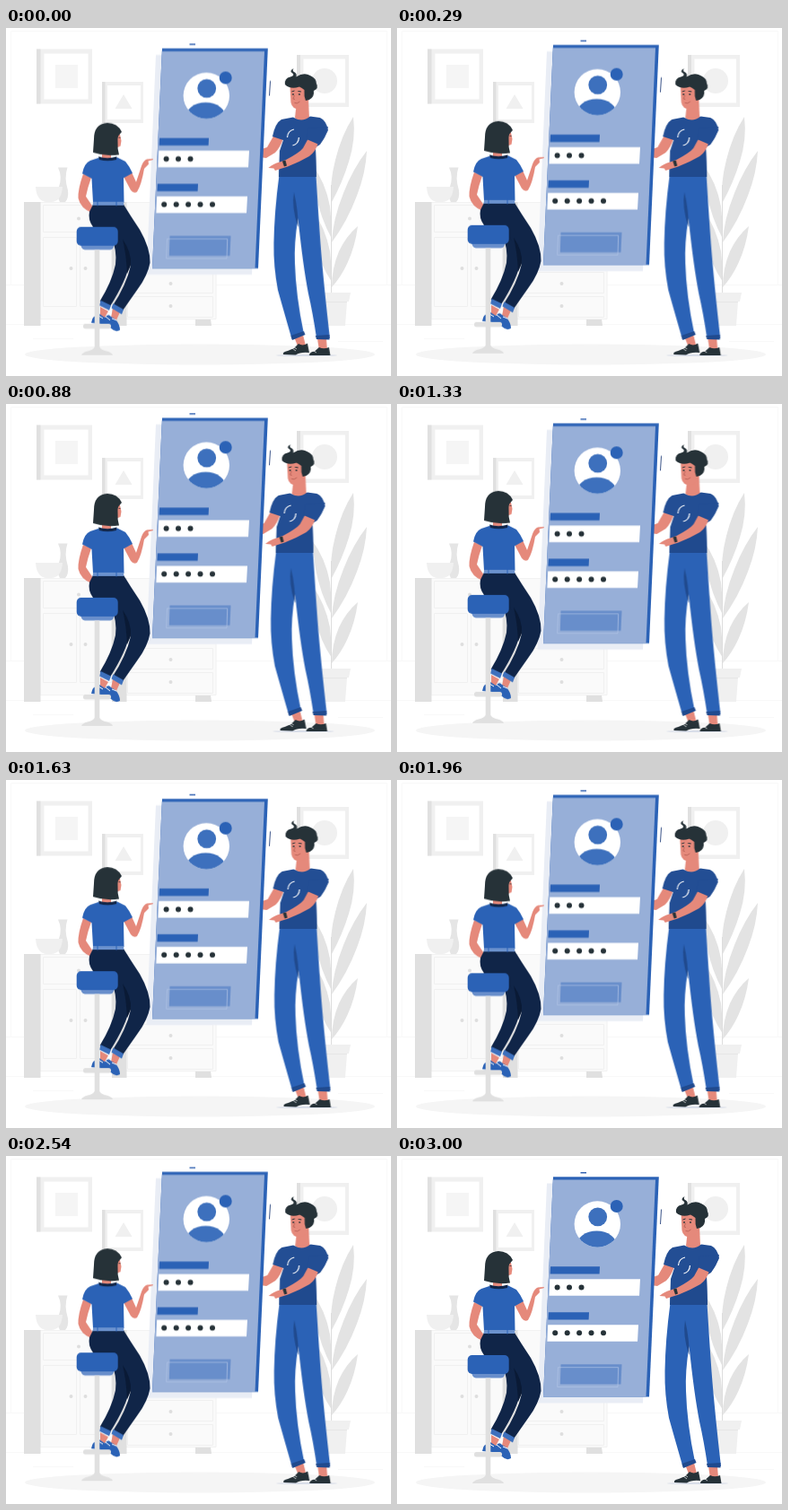
These frames come from a looping animation (429 px wide and 388 px high, 3040 ms). An HTML page:

```html
<!DOCTYPE html>
<html lang="en">
<head>
<meta charset="utf-8">
<title>Login illustration</title>
<style>
  html, body { margin: 0; width: 100%; height: 100%; overflow: hidden; background: #fff; }
  svg { display: block; width: 100vw; height: 100vh; }

  .blue { fill: #2b62b6; }
  .shirt { fill: #234e94; }
  .fold { fill: #204a8e; }
  .mid { fill: #3d70bd; }
  .pale { fill: #688ecb; }
  .navy { fill: #102548; }
  .ink { fill: #263238; }
  .skin { fill: #e5897b; }
  .white { fill: #fff; }
  .g1 { fill: #f5f5f5; }
  .g2 { fill: #f0f0f0; }
  .g3 { fill: #e0e0e0; }
  .line { fill: none; stroke: #f0f0f0; }
  .faint { fill: none; stroke: #f8f8f8; }

  /* 3 s of motion, then a 40 ms hold; starts just under way */
  .panel, .woman, .man { animation: 3.04s linear -40ms infinite; }
  .panel { animation-name: hover; }
  .woman { animation-name: rise; }
  .man { animation-name: shake; }

  @keyframes hover {
    0%, 49.342%, 98.684%, 100% { transform: translateY(0); }
    24.671%, 74.013% { transform: translateY(-10px); }
  }
  @keyframes rise {
    0%, 98.684%, 100% { transform: translateY(0); }
    49.342% { transform: translateY(-10px); }
  }
  @keyframes shake {
    0%, 98.684%, 100% { transform: translateX(0); }
    9.868%, 88.816% { transform: translateX(-1px); }
    19.737%, 78.947% { transform: translateX(2px); }
    29.605%, 49.342%, 69.079% { transform: translateX(-4px); }
    39.474%, 59.211% { transform: translateX(4px); }
  }
</style>
</head>
<body>
<svg viewBox="0 0 429 388" preserveAspectRatio="none">
  <defs>
    <clipPath id="avatar"><circle cx="223.3" cy="76" r="25.7"/></clipPath>
  </defs>

  <!-- room -->
  <path class="faint" d="M5.5 286V3.5H424.5V286M0 286.5H429M0 330.5H429M30 346.5H75M370 349.5H420"/>
  <g>
    <path class="g2" d="M34 23.500h62v61h-62z"/>
    <path class="g3" d="M34 23.500h4.500v61h-4.500z"/>
    <path class="white" d="M42.500 28.500h49v51h-49z"/>
    <path class="g1" d="M55 41h25v26h-25z"/>
    <path class="g2" d="M107 60h46v46h-46z"/>
    <path class="g3" d="M107 60h3.500v46h-3.500z"/>
    <path class="white" d="M113 64h37v38h-37z"/>
    <path class="g2" d="M131 74l9.500 16h-19z"/>
    <path class="g2" d="M324 30h58v58h-58z"/>
    <path class="g3" d="M324 30h4v58h-4z"/>
    <path class="white" d="M331.500 34.500h46.500v49h-46.500z"/>
    <circle class="g2" cx="355" cy="59" r="14"/>
  </g>

  <!-- cabinet -->
  <path class="g3" d="M20 325h18v7h-18zM211 324h17l1 8h-18z"/>
  <path d="M38 194.500h196v130h-196z" fill="#fafafa" stroke="#f2f2f2"/>
  <path class="g3" d="M20 194h18.500v138h-18.500zM118 194h16.500v138h-16.500z"/>
  <path class="line" d="M41.500 197.500h76v30h-76zM41.500 233.500h37v77h-37zM82.500 233.500h35v77h-35zM135.500 272.500h95v23h-95zM135.500 299.500h95v23h-95z"/>
  <g fill="#dedede">
    <circle cx="81" cy="212.500" r="2"/><circle cx="72.500" cy="268" r="2"/><circle cx="88.500" cy="268" r="2"/>
    <circle cx="183.500" cy="285" r="2"/><circle cx="183.500" cy="310" r="2"/>
  </g>
  <path fill="#e5e5e5" d="M58 155.500h10.500Q64.500 167 69 181Q70 190 66 194H60Q55 186 59 177Q63 166 58 155.500z"/>
  <path class="g2" d="M33 177H63Q62 193 51 194H44Q34 192 33 177z"/>

  <!-- plant -->
  <g fill="#e3e3e3">
    <path d="M363 194Q360 174 367 147Q374 119 387 99Q390 124 382 149Q375 172 363 194z"/>
    <path d="M363 239Q364 214 376 184Q387 156 402 137Q401 161 391 187Q380 216 363 239z"/>
    <path d="M363 289Q363 268 371 249Q379 232 392 221Q389 244 380 263Q373 278 363 289z"/>
    <path d="M363 235Q350 211 345 184L341 152Q356 172 361 199Q363 216 363 235z"/>
    <path d="M363 283Q350 264 345 240L341 202Q356 223 361 249Q363 266 363 283z"/>
  </g>
  <path d="M362.500 175V298" fill="none" stroke="#ddd"/>
  <path class="g2" d="M342 295H384L382 305H380L378 332H348L345 305H343z"/>
  <path d="M345 305.500H380" stroke="#e6e6e6"/>
  <ellipse class="g1" cx="216" cy="364" rx="195" ry="11.500"/>

  <g class="man">
    <ellipse cx="335" cy="365" rx="34" ry="1" fill="#d9dee9"/>
    <!-- far arm -->
    <path class="skin" d="M299 119L309 123Q306 133 300 139L290 145L283 144L282 136L291 133z"/>
    <!-- feet -->
    <path class="skin" d="M321 344L331 342L334 354L326 357zM347 346H357L358 359H349z"/>
    <path class="ink" d="M309 364Q308 361 314 360L321 357L326 352Q331 355 336 351.500L338 362Q328 361 323 364.500zM338 365Q338 361 344 360.500L349 356Q354 358.500 360 356L361.500 365z"/>
    <path d="M319 357l4 3M320 355l4 3M343 360l3 2" stroke="#fff" stroke-width=".7"/>
    <!-- trousers -->
    <path class="blue" d="M304.500 164H345.500Q348 205 350.500 240Q354 285 361 346L346 345Q342 318 337 296Q331 265 325.500 212Q321 240 322 262Q323 298 332 341L318.500 346.500Q308 310 303 292Q298 265 298.500 240Q299 205 304.500 164z"/>
    <path class="fold" d="M321 183Q318 200 325.500 222Q326 205 321 183zM317.500 343L332 338L333.500 342L319 348zM345 343L360.500 342V347.500L346 347z"/>
    <!-- neck and shirt -->
    <path class="skin" d="M324 83L337 78L338 100Q330 108 322 100z"/>
    <path class="shirt" d="M320 99.500Q330 106 339 98.500L350 100Q357 103 359 114Q355 123 350 130L345 133L346 166H304L305 137L309 125L297 121Q300 106 307 102z"/>
    <path class="fold" d="M304.500 158L331 146L345 134L346 166H304.500z"/>
    <path d="M313.500 122Q314 114.500 321 113M319.500 131Q326 129.500 326.500 122" fill="none" stroke="#fff" stroke-width="1.200"/>
    <!-- near arm -->
    <path class="skin" d="M337 123L348 128Q345 138 338 143Q326 150 314 154.500L306 157L300 159L298.500 156.500L292.500 156Q298 151 305 149.500L312 147Q327 139 331 134z"/>
    <path class="shirt" d="M337 112L359 110Q357 122 349 130L335 124z"/>
    <path class="ink" d="M308 148.500L311.500 147.500L313 153.500L310 154.500z"/>
    <!-- head -->
    <path class="skin" d="M316.500 64L336 62L338 78Q336 88 328 90.500Q319 91 317.500 83z"/>
    <path class="ink" d="M311 63Q310 56 317 54.500Q322 53 319.500 50.500Q315 48 320.500 45Q318.500 48 322 49.500Q324.500 51.500 323.500 54.500Q332 49 339 53Q346 56 346 62Q349 67 343 70Q344 77 338 80L334 81Q332 76 332.500 69Q329 66 327 65.500Q317 69 311 63z"/>
    <g fill="none" stroke="#263238" stroke-width="1">
      <path d="M318.500 71l3-1M325.500 70.500l3.500 .5"/>
      <path d="M321.500 75l-1.500 4l2 .500M321.500 83.500Q324.500 85 327.500 82" stroke="#b45d53" stroke-width=".8"/>
    </g>
    <circle class="ink" cx="320" cy="74" r=".9"/><circle class="ink" cx="327" cy="74" r=".9"/>
  </g>

  <g class="panel">
    <path d="M167 30.500H284L274 275.500H156.500z" fill="#e9edf5"/>
    <path class="blue" d="M174 23.300H291.800L281 268.500H163z"/>
    <path d="M173.800 26.600H288L277.500 268.500H163z" fill="#97afd8"/>
    <path d="M204.500 18.700H211" stroke="#2b5cae" stroke-width="1.400"/>
    <path d="M294.500 59.500L293.500 76" stroke="#3b5488"/>
    <circle class="white" cx="223.300" cy="76" r="25.700"/>
    <ellipse class="mid" cx="222.500" cy="101" rx="23" ry="17.500" clip-path="url(#avatar)"/>
    <circle class="mid" cx="223.700" cy="67.800" r="10.400"/>
    <circle class="blue" cx="244.700" cy="56" r="7"/>
    <path class="blue" d="M171 123.300H226L225.600 131.500H170.600zM168.800 174.300H214L213.600 182.500H168.400z"/>
    <path class="white" d="M170.300 137.200H271L270 155.700H169.500zM168.200 188.200H269L268 206.700H167.400z"/>
    <g class="ink">
      <circle cx="178.600" cy="146.500" r="3"/><circle cx="192" cy="146.500" r="3"/><circle cx="205.500" cy="146.500" r="3"/>
      <circle cx="176.200" cy="197.300" r="3"/><circle cx="189.700" cy="197.300" r="3"/><circle cx="203.100" cy="197.300" r="3"/>
      <circle cx="216.500" cy="197.300" r="3"/><circle cx="230" cy="197.300" r="3"/>
    </g>
    <path class="pale" d="M182.500 232.300H250.500L249.500 254.500H181.800z"/>
    <path d="M179.500 235.700H246.700L246 257.500H178.700z" fill="none" stroke="#b0c3e5" stroke-width=".7"/>
  </g>

  <g class="woman">
    <!-- arms -->
    <path class="skin" d="M86 163L95 167Q91 178 89 188L97 200L95 206Q83 201 80.500 190Q80 180 86 163z"/>
    <path class="skin" d="M131 166L140 161L145 172L151 154Q153 148 157 146.500L164 146L163.500 147.300L158.500 148.500L159 152L154 157Q151 175 146 183Q142 185 139 181z"/>
    <!-- feet -->
    <path class="skin" d="M105 311L114 316L110 323L105 323zM119 313L127 317L123 326L117 323z"/>
    <path class="blue" d="M95 329Q96 321 104 319L110 323Q115 327 119 328L117 331zM110 323Q114 318 117 322L122 325Q127 331 127 337Q122 340 117 335Q109 333 104 331z"/>
    <path d="M111 322l5 4M118 324l5 2M103 321l5 3" stroke="#fff" stroke-width="1"/>
    <!-- legs: far, near, shadow between -->
    <path class="navy" d="M97 215L135 225Q140 248 138 262Q134 282 116 310.500L104.500 305Q118 283 122 264Q124 248 117 232z"/>
    <path class="navy" d="M97 197H131Q139 210 149 225Q161 246 160.500 262Q158 276 147 291L129.500 316L118.500 310.500Q134 287 139 265Q136 250 126 236L97 222Q91 214 93 205z"/>
    <path d="M130 236Q140 250 139 265L135 274Q134 252 130 236z" fill="#0a1a35"/>
    <path class="mid" d="M105.500 304L117 309.500L115 315L104 309.500zM119.500 307.500L131 314L129 319.500L117.500 312.500z"/>
    <!-- neck and shirt -->
    <path class="skin" d="M107 135H117V147H107z"/>
    <path class="blue" d="M103 145Q113 150 124 144.500L133 149Q138 155 141 162L131 167.500L131.500 195H97L95.500 168L85 162.500Q87 151 94 148z"/>
    <path class="navy" d="M103 143.500Q113 147 123.500 143.500L123 147Q113 149.500 104 147z"/>
    <path d="M97 194H131L131.300 198H96.700z" fill="#6b92ce"/>
    <path d="M102 193.500v5M123 193.500v5" stroke="#2b62b6"/>
    <!-- head -->
    <path class="skin" d="M122 117L127 119L128.500 126L127.500 132L122 134z"/>
    <path class="ink" d="M98 124Q98 107 113 106Q124 106 129 116L126.500 119Q124 121 124.500 127Q124 135 126 141.500Q112 144 97 139z"/>
    <path d="M125.500 122.500h2" stroke="#263238" stroke-width=".8"/>
    <!-- stool -->
    <path class="pale" d="M83 241H120.500Q120 247.500 116 247.500H88Q84 247.500 83 241z"/>
    <rect class="blue" x="78.700" y="222" width="46" height="21" rx="5"/>
    <path class="g3" d="M98.700 247.500H104.300V356Q106 359 112 360.500Q118 362 119 365H84Q85 362 91 360.500Q97 359 98.700 356z"/>
    <rect class="g3" x="86" y="330" width="31" height="5.500" rx="2.500"/>
  </g>
</svg>
</body>
</html>
```
